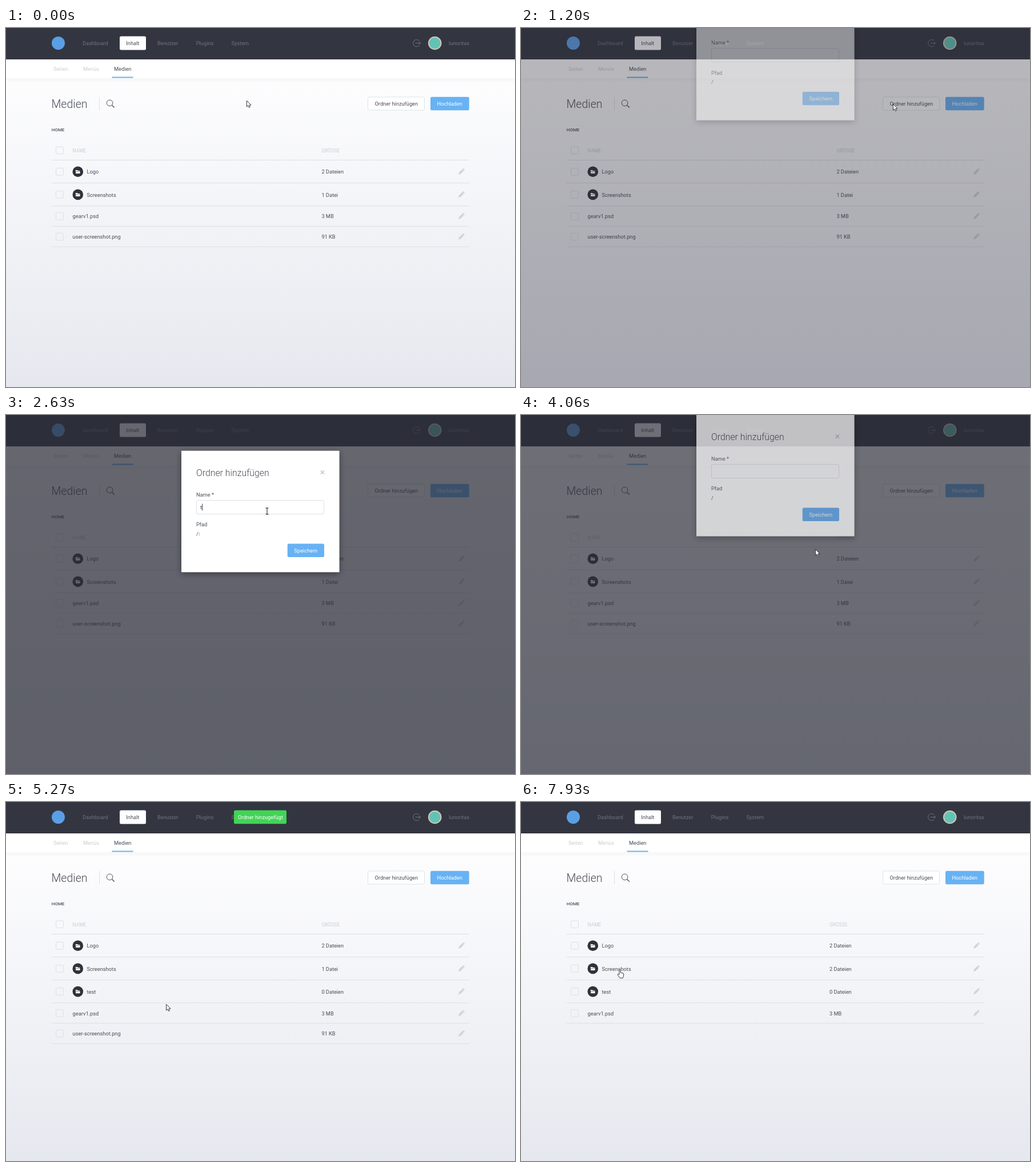
An HTML page that plays this animation: 891x629 px, repeating every 8 s.

```html
<!DOCTYPE html>
<html lang="de">
<head>
<meta charset="utf-8">
<title>Medien</title>
<style>
  html, body { margin: 0; width: 100%; height: 100%; overflow: hidden; }
  svg { display: block; font-family: Roboto, Arial, sans-serif; }
  .line { fill: none; stroke: #dcdfe6; }
</style>
</head>
<body>
<svg id="stage" width="891" height="629" viewBox="0 0 891 629">
  <defs>
    <linearGradient id="sky" x2="0" y2="1">
      <stop stop-color="#fff"/><stop offset=".14" stop-color="#fdfdfe"/><stop offset="1" stop-color="#e6e8ef"/>
    </linearGradient>
    <filter id="soft" x="-20%" y="-20%" width="140%" height="150%">
      <feDropShadow dx="0" dy="3" stdDeviation="6" flood-opacity=".4"/>
    </filter>
    <filter id="faint" x="-5%" y="-50%" width="110%" height="250%">
      <feDropShadow dx="0" dy="2" stdDeviation="5" flood-color="#32405a" flood-opacity=".05"/>
    </filter>
    <g id="folder">
      <path d="M-4-2.8H-.8L.2-1.8H3.4V-.9H-4Z" fill="#fff"/>
      <path d="M-4-.4H4L3.5 3.2H-3.5Z" fill="#fff"/>
    </g>
    <path id="pencil" transform="rotate(45)" fill="#d2d4d8"
      d="M-2-5.6q0-1.2 1.2-1.2h1.6q1.2 0 1.2 1.2v1.2h-4ZM-2-3.8h4v7.4L0 7.2-2 3.6Z"/>
    <path id="arrow" d="M.4.4V11L2.8 8.8 4.4 12.4 6.2 11.6 4.7 8.1H8Z" fill="#fff" stroke="#22242a" stroke-width=".9"/>
    <path id="hand" fill="#fff" stroke="#22242a" stroke-width=".9" stroke-linejoin="round"
      d="M-1 9V1.5a1.1 1.1 0 0 1 2.2 0V6L5 6.6Q7 7.1 6.8 9L6.2 12.6 5.2 15.5H.2L-3.6 10.2Q-4.4 8.8-3.1 8.3-2.1 8.1-1 9.6Z"/>
    <path id="beam" d="M-2.5-5.5H2.5M0-5.5V5.5M-2.5 5.5H2.5" stroke="#111" fill="none"/>
    <path id="grab" fill="#fff" stroke="#22242a" stroke-width=".9" stroke-linejoin="round"
      d="M-3 7.5L-7 1Q-7-1-5-.4L-3.8 1V-5Q-2.8-6.6-1.8-5V-1-6.4Q-.8-8 .2-6.4V-1-5.8Q1.2-7.4 2.2-5.8V-.6-3.8Q3.4-5.2 4.6-3.8V3L3 7.5Z"/>
    <g id="copy">
      <path d="M0 0V9.4L2.2 7.5 3.6 10.4 5 9.8 3.7 6.9H6.8Z"/>
      <path d="M2 10V13.5H6M5 9.5H7.5V12" fill="none" stroke="#444" stroke-width=".7"/>
      <rect x="6" y="12" width="7" height="7"/>
      <path d="M9.5 13.5V17.5M7.5 15.5H11.5" stroke="#fff"/>
    </g>
  </defs>
  <g id="page"></g>
  <g id="table"></g>
  <g id="toast"></g>
  <rect id="shade" width="891" height="629" fill="#2a2c36"/>
  <g id="modal"></g>
  <g id="ghost" opacity=".7"></g>
  <use id="cursor"/>
</svg>
<script>
const $ = id => document.getElementById(id);
const INK = '#4a4d58', DIM = '#70737d', PALE = '#cdced3', BLUE = '#68b2f4';

// Text placed by its left edge and the middle of its capitals
const text = (x, cy, s, fill = INK, size = 9.24, more = '') =>
  `<text x="${x}" y="${cy + size * .355}" font-size="${size}" fill="${fill}" ${more}>${s}</text>`;
const box = (x, y, w, h, fill, more = '') =>
  `<rect x="${x}" y="${y}" width="${w}" height="${h}" rx="2.5" fill="${fill}" ${more}/>`;
const check = cy => `<rect x="87.5" y="${cy - 6.3}" width="13" height="12.6" rx="2" class="line"/>`;
const rule = y => `<path d="M80 ${y}H811" class="line"/>`;

$('page').innerHTML =
  '<rect width="891" height="629" fill="url(#sky)"/>' +
  '<rect y="55" width="891" height="33" fill="#fff" filter="url(#faint)"/>' +
  '<rect width="891" height="55" fill="#333640"/>' +
  '<circle cx="91.5" cy="26.5" r="11.5" fill="#5a9fe6"/>' +
  box(199, 14.5, 46, 24, '#fff') +
  text(134, 26.8, 'Dashboard', DIM) + text(210.3, 26.8, 'Inhalt') + text(265, 26.8, 'Benutzer', DIM) +
  text(332.8, 26.8, 'Plugins', DIM) + text(394.5, 26.8, 'System', DIM) +
  `<path d="M723.5 23A6 6 0 1 0 723.5 30M716.5 26.5H725.5M723 24.3L725.5 26.5 723 28.7" fill="none" stroke="${DIM}"/>` +
  '<circle cx="750.7" cy="26.5" r="10.8" fill="#62c3b5" stroke="#d3c4b8" stroke-width="2"/>' +
  text(811, 26.8, 'lunoritas', DIM, 9.24, 'text-anchor="end"') +
  text(83, 71.5, 'Seiten', PALE) + text(135, 71.5, 'Menüs', PALE) + text(189, 71.5, 'Medien') +
  `<rect x="185.5" y="85.5" width="37" height="2" fill="${BLUE}"/>` +
  text(79.5, 132.7, 'Medien', INK, 19.5, 'font-weight="300"') +
  '<path d="M163.5 121V144" class="line"/>' +
  `<path d="M185.5 135.3L189.7 139.5" stroke="${INK}" stroke-width="1.3"/>` +
  `<circle cx="181.6" cy="131.4" r="5.3" fill="none" stroke="${INK}"/>` +
  box(633.5, 121, 99, 23, '#fff', 'stroke="#d8e5e7"') + text(645.5, 132.7, 'Ordner hinzufügen') +
  box(743, 120.8, 67.7, 23.4, BLUE) + text(754.5, 132.7, 'Hochladen', '#fff') +
  text(79.8, 177.8, 'HOME', INK, 7.92, 'font-weight="500"');

$('toast').innerHTML = box(399, 14.6, 92, 23.6, '#42d456') + text(406, 26.8, 'Ordner hinzugefügt', '#fff');

$('modal').innerHTML =
  '<rect x="307" y="62.7" width="276.5" height="212.6" fill="#fff" filter="url(#soft)"/>' +
  text(333, 101.3, 'Ordner hinzufügen', INK, 15.84, 'font-weight="300"') +
  '<path d="M551 97.5L557 103.5M557 97.5L551 103.5" stroke="#bfc1c7" stroke-width="1.4"/>' +
  text(333, 139.3, 'Name *') + box(333.5, 149.5, 223, 24, '#fff', 'class="line"') +
  text(340, 161.5, '', '#333640', 9.24, 'id="typed"') +
  '<path id="caret" d="M0 155.5V167.5" stroke="#222" stroke-width=".9"/>' +
  text(333, 192, 'Pfad') + text(333, 208.7, '/') + text(336.8, 208.7, '', INK, 9.24, 'id="path"') +
  box(492.7, 225.4, 64.3, 23.6, BLUE, 'id="save"') + text(504.3, 237.4, 'Speichern', '#fff');

$('ghost').innerHTML = text(0, 0, 'user-screenshot.png');

const smooth = (t, from, length) => {
  const p = Math.min(1, Math.max(0, (t - from) / length));
  return p * p * (3 - 2 * p);
};

// time, x, y and the pointer's look from then on
const moves = [
  [0, 421, 127, 'arrow'], [190, 421, 127, 'arrow'], [700, 646, 134, 'hand'], [800, 646, 134, 'hand'],
  [860, 651, 134, 'hand'], [1030, 651, 133, 'arrow'], [1250, 651, 133, 'arrow'], [1820, 457, 176, 'arrow'],
  [1890, 456, 176, 'arrow'], [2060, 456, 176, 'arrow'], [2130, 457, 170, 'beam'], [2220, 457, 168.5, 'beam'],
  [2920, 457, 168.5, 'beam'], [3020, 460, 176, 'arrow'], [3540, 515, 236, 'hand'], [3970, 515, 235, 'arrow'],
  [4070, 515, 235, 'arrow'], [4440, 483, 234, 'arrow'], [4780, 483, 234, 'arrow'], [5560, 189, 408, 'grab'],
  [5690, 188, 409, 'grab'], [5840, 186, 411, 'grab'], [5960, 186, 411, 'copy'], [6310, 188, 334, 'copy'],
  [6380, 188, 334, 'copy'], [6680, 182, 304, 'copy'], [6940, 182, 304, 'copy'], [7080, 179, 303, 'copy'],
  [7210, 176, 299, 'hand'], [7560, 176, 299, 'hand'], [7920, 173, 293, 'hand'], [8000, 173, 293, 'hand']
];

function pointer(t) {
  const i = moves.findLastIndex(m => t >= m[0]);
  const [t0, x0, y0, look] = moves[i], [t1, x1, y1] = moves[i + 1];
  const p = smooth(t, t0, t1 - t0);
  return { x: x0 + (x1 - x0) * p, y: y0 + (y1 - y0) * p, look };
}

let shown = '';
function drawTable(t, dropY) {
  const added = t >= 4150, moved = t >= 7300, sizeX = moved ? 540 : 552.4;
  const rows = [['Logo', '2 Dateien', 1], ['Screenshots', moved ? '2 Dateien' : '1 Datei', 1]];
  if (added) rows.push(['test', '0 Dateien', 1]);
  rows.push(['gearv1.psd', '3 MB']);
  if (!moved) rows.push(['user-screenshot.png', '91 KB']);

  let y = 231.5;
  let out = check(214.3) + text(116.6, 214.7, 'NAME', PALE, 8.45) + text(sizeX, 214.7, 'GRÖSSE', PALE, 8.45) + rule(y);
  for (const [name, size, folder] of rows) {
    const h = folder ? 40.15 : 35.75, cy = y + h / 2 + .2;
    const hot = folder && dropY > y && dropY < y + h;
    if (folder) out += `<g transform="translate(125.8 ${cy})"><circle r="9.3" fill="${hot ? BLUE : '#2f323c'}"/><use href="#folder"/></g>`;
    out += check(cy) + text(folder ? 141.5 : 116.6, cy + .3, name, hot ? BLUE : INK) + text(sizeX, cy + .3, size) +
      `<use href="#pencil" x="0" transform="translate(797 ${cy})"/>`;
    y += h;
    out += rule(y);
  }
  if (out !== shown) $('table').innerHTML = shown = out;
}

function draw(t) {
  const { x, y, look } = pointer(t), dragging = look === 'copy';
  $('cursor').setAttribute('href', '#' + look);
  $('cursor').setAttribute('transform', `translate(${x} ${y})`);
  drawTable(t, dragging ? y : -1);

  $('ghost').style.display = dragging ? '' : 'none';
  $('ghost').setAttribute('transform', `translate(${x - 69.3} ${y - 6})`);

  const open = smooth(t, 1010, 400) * (1 - smooth(t, 3935, 350));
  $('modal').setAttribute('opacity', open);
  $('modal').setAttribute('transform', `translate(0 ${-213 * (1 - open)})`);
  $('shade').setAttribute('opacity', .72 * smooth(t, 1010, 400) * (1 - smooth(t, 4010, 350)));

  const count = t < 3970 ? [2625, 2705, 2795, 2955].filter(k => t >= k).length : 0;
  const word = 'test'.slice(0, count);
  $('typed').textContent = $('path').textContent = word;
  $('path').setAttribute('opacity', .4 + .6 * smooth(t, 2640, 160));
  $('caret').style.display = count && t < 3490 ? '' : 'none';
  $('caret').setAttribute('transform', `translate(${340.7 + $('typed').getComputedTextLength()} 0)`);
  $('save').setAttribute('fill', t > 3500 && t < 4500 ? '#5ba6f0' : BLUE);

  const note = smooth(t, 4480, 350) * (1 - smooth(t, 7560, 360));
  $('toast').setAttribute('opacity', note);
  $('toast').setAttribute('transform', `translate(0 ${-26 * (1 - note)})`);
}

(function frame() {
  draw(performance.now() % 8000);
  requestAnimationFrame(frame);
})();
</script>
</body>
</html>
```
